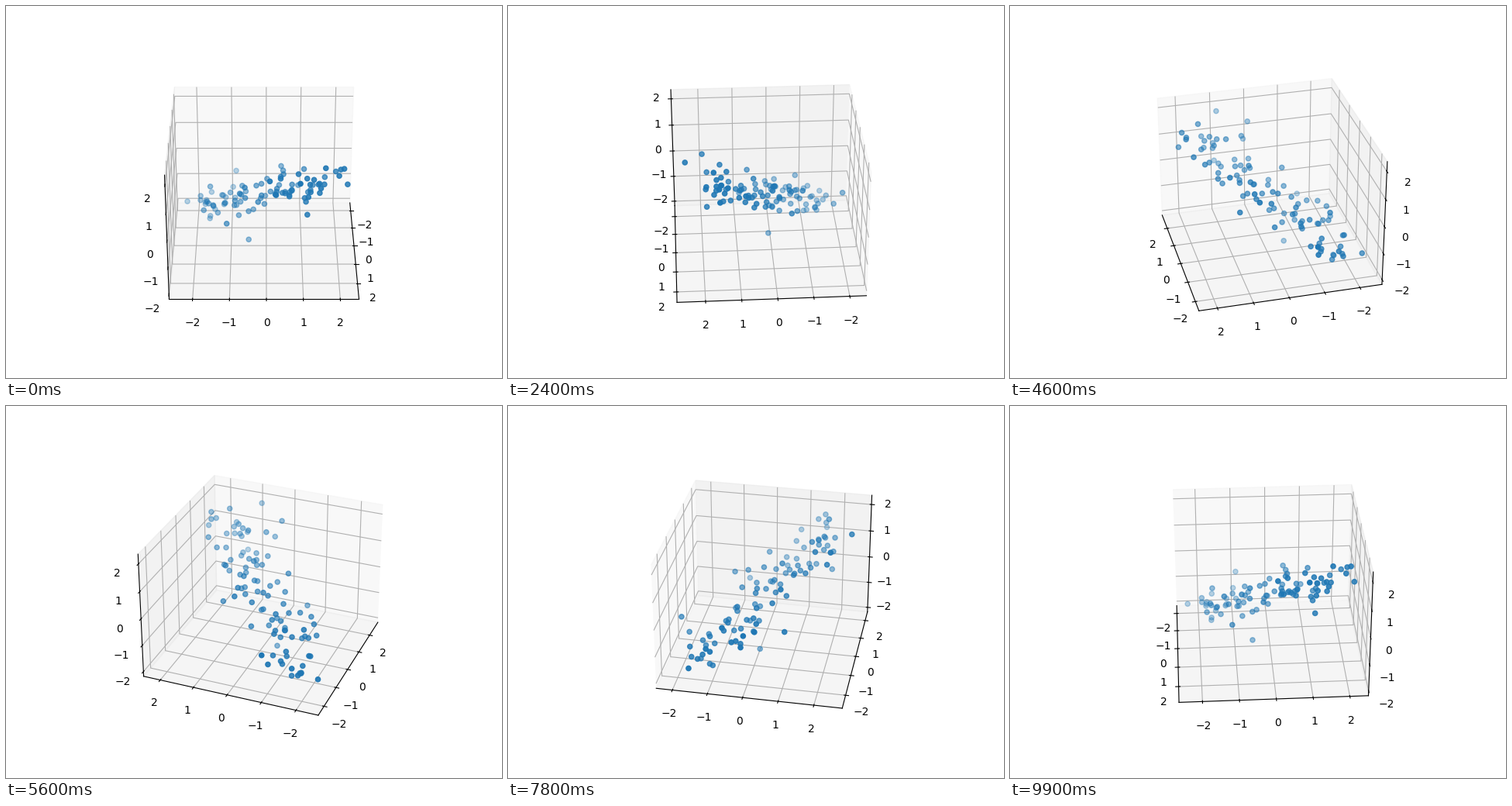
Animation of 640 by 480 pixels, one loop 10000 ms. Source, as a matplotlib script:

```python
import numpy as np
import matplotlib.pyplot as plt
from matplotlib.animation import FuncAnimation

FRAMES = 100
TOTAL = 100
XLIM, YLIM, ZLIM = (-2.464, 2.788), (-2.634, 2.507), (-2.182, 2.345)

# Points that stand apart from the cloud and set its outline
OUTLIERS = np.array([
    (2.45, 0.89, 1.82), (1.97, 0.09, 1.59), (-2.13, -0.88, -0.67),
    (-1.60, -2.31, -1.54), (0.07, -0.50, -1.89), (1.88, 1.10, 0.32),
    (1.54, 2.18, 1.20), (1.51, 2.08, 1.74), (-0.84, 0.42, 0.34),
    (0.89, -1.10, -0.70),
])


def diagonal_cloud(n, seed=7):
    """Noisy points strung evenly along the diagonal of the box."""
    rng = np.random.default_rng(seed)
    t = np.linspace(-1.75, 1.7, n)
    across = np.clip(rng.normal(0, .38, n), -.75, .75)
    lift = np.clip(rng.normal(0, .34, n), -.65, .65)
    x = .1 + t - across
    y = t + across
    z = .03 + .88 * t + lift
    points = np.column_stack([x, y, z])
    return np.clip(points, (-1.9, -1.9, -1.85), (1.9, 2.0, 2.05))


cloud = np.vstack([OUTLIERS, diagonal_cloud(TOTAL - len(OUTLIERS))])

fig = plt.figure(figsize=(6.4, 4.8), dpi=100)
ax = fig.add_subplot(projection="3d")
ax.scatter(*cloud.T)
ax.set(xlim=XLIM, ylim=YLIM, zlim=ZLIM)
for axis in (ax.xaxis, ax.yaxis, ax.zaxis):
    axis.set_ticks(range(-2, 3))


def update(i):
    ax.view_init(elev=30, azim=i * 360 / FRAMES)
    return ()


anim = FuncAnimation(fig, update, frames=FRAMES, interval=100,
                     repeat=True, repeat_delay=0)
plt.show()
```
